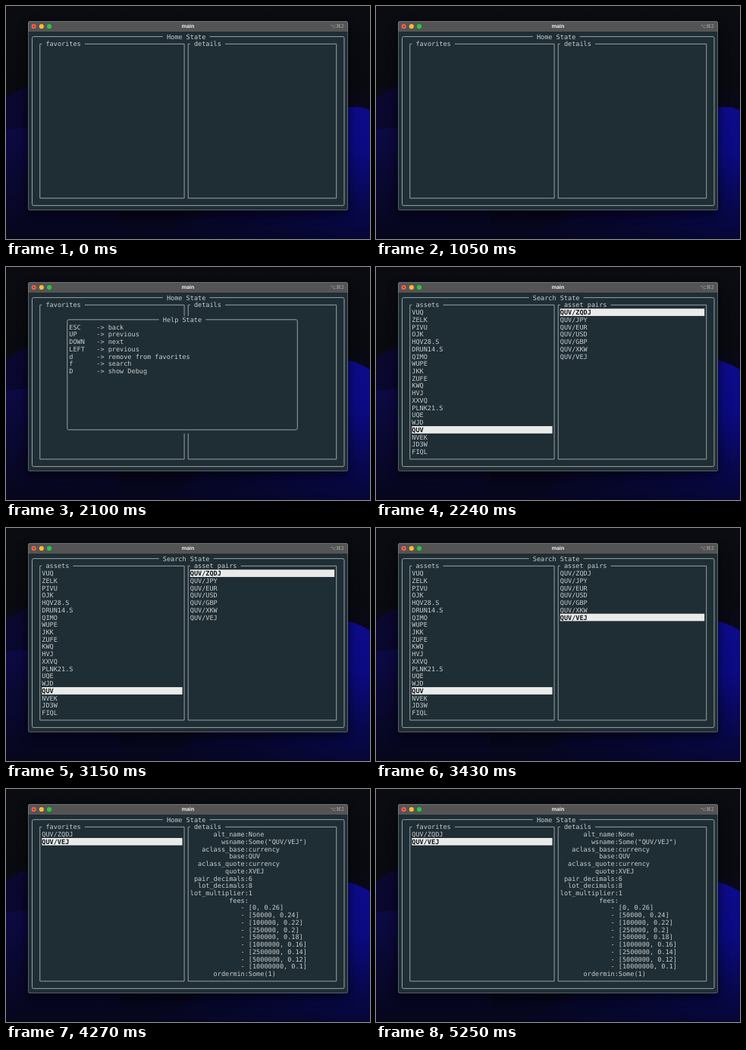
Recreate the animation shown at these times as an HTML page. Size 480 px wide and 309 px high, loop 5.32 s.

```html
<!DOCTYPE html>
<html lang="en">
<head>
<meta charset="utf-8">
<title>main</title>
<style>
html, body { margin: 0; width: 100%; height: 100%; overflow: hidden; background: #0a0b10; }
svg { display: block; }
.term text {
  font: 8.544px "DejaVu Sans Mono", "Liberation Mono", monospace;
  fill: #c9cfce; white-space: pre; text-rendering: geometricPrecision;
}
.term text.on { font-weight: bold; fill: #0c1114; }
.term path { fill: none; stroke: #98a3a5; stroke-width: 1; }
.bar { font: bold 7px Inter, "Open Sans", sans-serif; fill: #ececec; text-rendering: geometricPrecision; }
.keys { font: 6.6px "DejaVu Sans", sans-serif; fill: #a8a8a8; text-rendering: geometricPrecision; }
</style>
</head>
<body>
<svg width="480" height="309" viewBox="0 0 480 309" xmlns="http://www.w3.org/2000/svg">
  <defs>
    <linearGradient id="sky" x2="0" y2="1">
      <stop offset="0" stop-color="#0b0c11"/>
      <stop offset=".33" stop-color="#090a10"/>
      <stop offset=".5" stop-color="#08081f"/>
    </linearGradient>
    <linearGradient id="back" x2="0" y2="1">
      <stop offset="0" stop-color="#0a0830"/>
      <stop offset=".3" stop-color="#09072c"/>
      <stop offset="1" stop-color="#070620"/>
    </linearGradient>
    <linearGradient id="front" x2="0" y2="1">
      <stop offset="0" stop-color="#0c0a44"/>
      <stop offset=".5" stop-color="#090830"/>
      <stop offset="1" stop-color="#06061c"/>
    </linearGradient>
    <linearGradient id="hillFill" gradientUnits="userSpaceOnUse" x1="0" y1="130" x2="0" y2="309">
      <stop offset="0" stop-color="#0d0b8a"/>
      <stop offset=".35" stop-color="#0b0a80"/>
      <stop offset=".7" stop-color="#080854"/>
      <stop offset="1" stop-color="#060636"/>
    </linearGradient>
    <linearGradient id="fade">
      <stop offset="0" stop-color="#06061c"/>
      <stop offset=".6" stop-color="#06061c" stop-opacity=".5"/>
      <stop offset="1" stop-color="#06061c" stop-opacity="0"/>
    </linearGradient>
    <filter id="soft" x="-20%" y="-20%" width="140%" height="150%">
      <feGaussianBlur stdDeviation="7"/>
    </filter>
  </defs>

  <rect width="480" height="309" fill="url(#sky)"/>
  <path d="M0 122C10 118 14 109 32 107C150 100 300 190 480 150V309H0Z" fill="url(#back)"/>
  <path d="M0 164C12 162 22 162 34 161C110 152 150 262 240 309H0Z" fill="url(#front)"/>
  <path id="hill" fill="url(#hillFill)"/>
  <rect x="150" y="265" width="300" height="44" fill="url(#fade)"/>

  <rect x="28" y="26" width="424" height="250" rx="5" fill="#000" opacity=".6" filter="url(#soft)"/>
  <rect x="29" y="20" width="422" height="251" rx="2.5" fill="#1f2d34"/>
  <path d="M29 34V22.5a2.5 2.5 0 0 1 2.5-2.5H448.5a2.5 2.5 0 0 1 2.5 2.5V34Z" fill="#545454"/>
  <rect x="29.5" y="20.5" width="421" height="250" rx="2" fill="none" stroke="#8b9396" stroke-opacity=".5"/>
  <circle cx="36.6" cy="27" r="3.1" fill="#fb5f57"/>
  <circle cx="36.6" cy="27" r=".9" fill="#8c1a15"/>
  <circle cx="46.8" cy="27" r="3.1" fill="#fdbc2e"/>
  <circle cx="57" cy="27" r="3.1" fill="#28c840"/>
  <text class="bar" x="240" y="29.4" text-anchor="middle">main</text>
  <text class="keys" x="446" y="28.9" text-anchor="end">⌥⌘2</text>
  <g class="term" id="term"></g>
</svg>

<script>
const CELL_W = 5.144, CELL_H = 9.74;
const left = col => 31.9 + col * CELL_W;
const midX = col => left(col + 0.5);
const midY = row => 40.6 + row * CELL_H;

const text = (col, row, str, cls = "") =>
  `<text class="${cls}" x="${left(col)}" y="${midY(row) + 3}">${str}</text>`;

// Border through cell centres, open where the title sits.
function box(c0, r0, c1, r1, title, titleCol, round = 0) {
  const [x0, y0, x1, y1] = [midX(c0), midY(r0), midX(c1), midY(r1)];
  const arc = (dx, dy) => `a${round} ${round} 0 0 0 ${dx * round} ${dy * round}`;
  const d = `M${left(titleCol - 1)} ${y0}H${x0 + round}${arc(-1, 1)}V${y1 - round}${arc(1, 1)}` +
    `H${x1 - round}${arc(1, -1)}V${y0 + round}${arc(-1, -1)}H${left(titleCol + title.length + 1)}`;
  return `<path d="${d}"/>` + text(titleCol, r0, title);
}

function list(c0, c1, items, selected) {
  return items.map((item, i) => {
    const row = i + 2, on = i === selected;
    const mark = on ? `<rect x="${left(c0)}" y="${midY(row) - CELL_H / 2}" ` +
      `width="${(c1 - c0) * CELL_W}" height="${CELL_H}" fill="#e8ebe8"/>` : "";
    return mark + text(c0, row, item, on ? "on" : "");
  }).join("");
}

const screen = (title, col, a, b) =>
  box(0, 0, 80, 23, title, col, 2) + box(2, 1, 39, 22, a, 4) + box(40, 1, 78, 22, b, 42);
const home = screen("Home State", 35, "favorites", "details");
const search = screen("Search State", 34, "assets", "asset pairs");

const assets = ("VUQ ZELK PIVU OJK HQV28.S DRUN14.S QIMO WUPE JKK ZUFE KWQ HVJ XXVQ " +
  "PLNK21.S UQE WJD QUV NVEK JD3W FIQL").split(" ");
const pairs = "ZQDJ JPY EUR USD GBP XKW VEJ".split(" ").map(q => "QUV/" + q);

const help = [
  ["ESC", "back"], ["UP", "previous"], ["DOWN", "next"], ["LEFT", "previous"],
  ["d", "remove from favorites"], ["f", "search"], ["D", "show Debug"]
];
const popup =
  `<rect x="${left(9)}" y="${midY(2.5)}" width="${60 * CELL_W}" height="${16 * CELL_H}" fill="#1f2d34"/>` +
  box(9, 3, 68, 18, "Help State", 34, 2) +
  help.map(([key, use], i) => text(10, i + 4, key.padEnd(7) + "-&gt; " + use)).join("");

const field = (name, value) => name.padStart(14) + ":" + value;
const fees = [[0, 0.26], [50000, 0.24], [100000, 0.22], [250000, 0.2], [500000, 0.18],
  [1000000, 0.16], [2500000, 0.14], [5000000, 0.12], [10000000, 0.1]];
const details = [
  field("alt_name", "None"),
  field("wsname", `Some("${pairs[6]}")`),
  field("aclass_base", "currency"),
  field("base", "QUV"),
  field("aclass_quote", "currency"),
  field("quote", "XVEJ"),
  field("pair_decimals", 6),
  field("lot_decimals", 8),
  field("lot_multiplier", 1),
  field("fees", ""),
  ...fees.map(([size, fee]) => "-".padStart(14) + ` [${size}, ${fee}]`),
  field("ordermin", "Some(1)")
];

// The wallpaper's right hill has a rounder crest before the popup opens.
const roundHill = "M180 309C290 290 370 142 450 134.5C462 132.5 472 134 480 138.5V309Z";
const steepHill = "M180 309C290 290 370 126 446 123C458 124 470 130 480 136V309Z";

const find = pair => search + list(3, 39, assets, 16) + list(41, 78, pairs, pair);
const steps = [
  [0, home, roundHill],
  [1120, home + popup, steepHill],
  [2170, find(0), steepHill],
  [3220, find(6), steepHill],
  [4270, home + list(3, 39, [pairs[0], pairs[6]], 1) + list(41, 78, details, -1), steepHill]
];
const LOOP = 5320;

const hill = document.getElementById("hill");
const term = document.getElementById("term");
term.innerHTML = steps.map(([, view]) => `<g display="none">${view}</g>`).join("");
const views = [...term.children];

const start = performance.now();
function draw(now) {
  const t = Math.max(0, now - start) % LOOP;
  const current = steps.filter(([at]) => at <= t).length - 1;
  views.forEach((view, i) => view.setAttribute("display", i === current ? "inline" : "none"));
  hill.setAttribute("d", steps[current][2]);
  requestAnimationFrame(draw);
}
draw(start);
</script>
</body>
</html>
```
